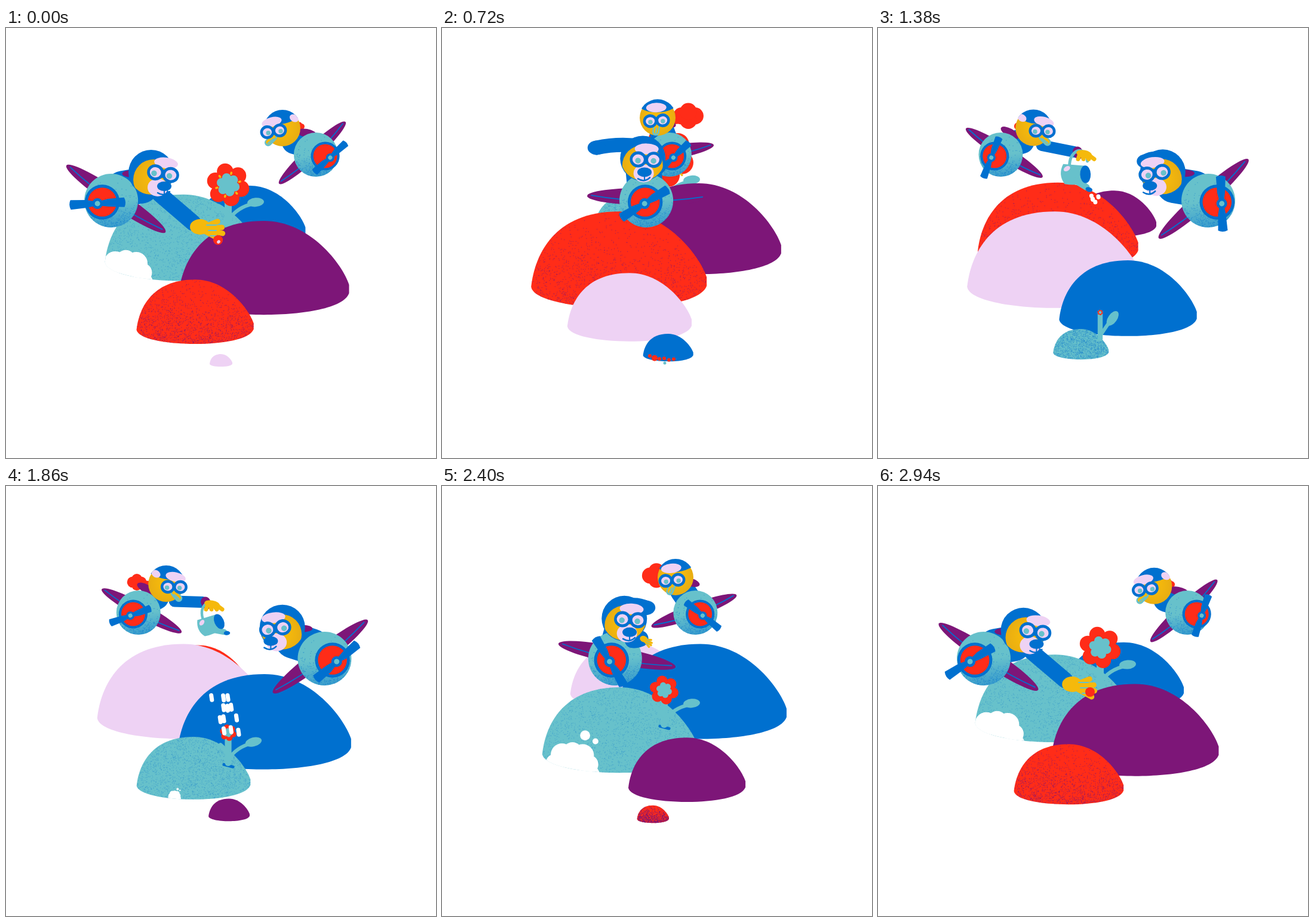
Animation of 720 by 720 pixels, one loop 3000 ms. Source, as an HTML page with a canvas:

```html
<!DOCTYPE html>
<html lang="en">
<head>
<meta charset="utf-8">
<title>Two pilots and a flower</title>
<style>
html, body { margin: 0; width: 100%; height: 100%; overflow: hidden; background: #fff; }
canvas { display: block; width: 720px; height: 720px; }
</style>
</head>
<body>
<canvas id="stage" width="720" height="720"></canvas>
<script>
const g = document.getElementById('stage').getContext('2d');
const LOOP = 3000, STEP = 60, RAD = Math.PI / 180;
const BLUE = '#0070cf', TEAL = '#67c1cb', RED = '#ff2c18', PURPLE = '#7d1678',
  YELLOW = '#f5b90c', LILAC = '#eed2f4', WHITE = '#fff';

const { sin, cos, abs, min, max, sign } = Math;
const clamp = v => min(1, max(0, v));
const since = (t, birth) => (t - birth + LOOP) % LOOP;

// Hills swing to alternate sides as they grow, rise and sink back
const tealHill = { birth: 1140, swing: -65, size: 235, color: TEAL, grain: BLUE };
const hills = [
  { birth: 0, swing: -65, size: 262, color: LILAC },
  { birth: 540, swing: 75, size: 262, color: BLUE },
  tealHill,
  { birth: 1740, swing: 75, size: 262, color: PURPLE },
  { birth: 2340, swing: -65, size: 262, color: RED, grain: PURPLE }];
const HILL_LIFE = 2700;

function hillBox(hill, age) {
  const phase = age < 1600 ? age / 1600 : 1 + (age - 1600) / 1400;
  const k = sin(phase * 90 * RAD), early = min(age, 1300);
  const w = 38 + hill.size * k, h = w * .55;
  const base = 567 - .045 * age - 1.9e-5 * early * (2 * age - early);
  return { x: 360 + hill.swing * k ** .8 - w / 2, y: base - h, w, h };
}

function random(seed) {
  return () => (seed = (seed * 16807) % 2147483647) / 2147483647;
}

function makeGrain(count, seed, keep) {
  const rnd = random(seed), out = [];
  while (out.length < count) {
    const x = rnd(), y = rnd();
    if (rnd() < keep(x, y)) out.push([x, y]);
  }
  return out;
}
const redGrain = makeGrain(1700, 11, (x, y) => .08 + .5 * y * y + .35 * max(0, .45 - x));
const tealGrain = makeGrain(2600, 23, () => 1);
const ballGrain = makeGrain(500, 37, (x, y) => y ** 3);

function sprinkle(grain, x, y, w, h, color, alpha) {
  g.globalAlpha = alpha;
  g.fillStyle = color;
  const count = grain.length * min(1, w / 90);
  for (let i = 0; i < count; i++) g.fillRect(x + grain[i][0] * w, y + grain[i][1] * h, 1.2, 1.2);
  g.globalAlpha = 1;
}

function oval(x, y, rx, ry, color, deg = 0) {
  g.beginPath();
  g.ellipse(x, y, rx, ry, deg * RAD, 0, 7);
  g.fillStyle = color;
  g.fill();
}
const dot = (x, y, r, color) => oval(x, y, r, r, color);

function line(color, width, ...pts) {
  g.beginPath();
  g.moveTo(pts[0], pts[1]);
  if (pts.length === 6) g.quadraticCurveTo(...pts.slice(2));
  else g.lineTo(pts[2], pts[3]);
  g.strokeStyle = color;
  g.lineWidth = width;
  g.lineCap = 'round';
  g.stroke();
}

function placed(x, y, deg, scale, draw) {
  g.save();
  g.translate(x, y);
  g.rotate(deg * RAD);
  g.scale(scale, scale);
  draw();
  g.restore();
}

function insideCircle(x, y, r, draw) {
  g.save();
  g.beginPath();
  g.arc(x, y, r, 0, 7);
  g.clip();
  draw();
  g.restore();
}

function drawHill(hill, age) {
  const { x, y, w, h } = hillBox(hill, age);
  const curve = (a, b, c, d, e, f) =>
    g.bezierCurveTo(x + a * w, y + b * h, x + c * w, y + d * h, x + e * w, y + f * h);
  g.save();
  g.beginPath();
  g.moveTo(x, y + .78 * h);
  curve(.02, .45, .13, 0, .5, 0);
  curve(.77, 0, .96, .46, 1, .68);
  g.lineTo(x + w, y + .77 * h);
  curve(.97, .93, .73, 1, .5, 1);
  curve(.25, 1, .01, .92, 0, .78);
  g.fillStyle = hill.color;
  g.fill();
  g.clip();
  if (hill.color === RED) sprinkle(redGrain, x, y, w, h, PURPLE, .6);
  if (hill === tealHill) {
    sprinkle(tealGrain, x, y, w, h, BLUE, .25);
    if (age > 620) drawBite(x + w * 240 / age, y + h * .96, w * .19 * clamp((age - 500) / 700), age);
  }
  g.restore();
  if (hill === tealHill) drawFlower(age);
}

function drawBite(x, y, s, age) {
  dot(x - .15 * s, y + .15 * s, .8 * s, WHITE);
  for (let i = 0; i < 6; i++) {
    const a = (i * 36 - 160) * RAD;
    dot(x + cos(a) * s * .6, y + sin(a) * s * .6, (.32 + .06 * (i % 2)) * s, WHITE);
  }
  if (age < 1600) {
    dot(x + .45 * s, y - 1.15 * s, .17 * s, WHITE);
    dot(x + .8 * s, y - .95 * s, .1 * s, WHITE);
  }
}

function drawFlower(age) {
  const R = .0195 * age * clamp((2760 - age) / 180);
  if (age < 120 || R === 0) return;
  const x = 372, y = 508 - .132 * min(age, 1900) - .06 * max(0, age - 1900);
  const foot = y + 44 + .013 * age, lx = x + min(58, 22 + .045 * age), ly = y + 5 + .012 * age;
  const open = clamp((age - 400) / 400);
  if (age > 650 && age < 1600) line(BLUE, 5, x - 7, foot, x + 8, foot + 4);
  line(TEAL, min(12, 7 + R * .3), x, y, x, foot - 3);
  line(TEAL, 6, x, foot - 8, x + 14, ly + 10, lx - 14, ly + 4);
  oval(lx - 12, ly + 2, 14, 7.5, TEAL, -50 * (1 - open) - 5);
  if (open) line(TEAL, 8, x, foot - 18, x - 8, foot - 28, x - 16 * open, foot - 32);

  const ring = (dist, r, color) => {
    for (let a = 17; a < 360; a += 60) dot(x + cos(a * RAD) * R * dist, y + sin(a * RAD) * R * dist, R * r, color);
  };
  ring(.62, .38, RED);
  dot(x, y, R * .65, RED);
  ring(.33, .21, TEAL);
  dot(x, y, R * .42, TEAL);
  const grow = clamp((age - 1800) / 540);
  if (grow) for (let a = 45; a < 400; a += 60) {
    const c = cos(a * RAD) * R, s = sin(a * RAD) * R, end = .54 + .3 * grow;
    line(YELLOW, 3.5, x + c * .52, y + s * .52, x + c * end, y + s * end);
  }
}

function drawWing(x, y, deg, len, thick) {
  placed(x, y, deg, 1, () => {
    oval(0, 0, len, thick, PURPLE);
    line(BLUE, 1.8, -len * .93, -1, 0, thick, len * .93, -1);
  });
}

function drawBall(x, y, r, hubX, hubY) {
  dot(x, y, r, TEAL);
  insideCircle(x, y, r, () => {
    const shade = g.createLinearGradient(x, y - r, x + r * .25, y + r);
    shade.addColorStop(.5, 'rgba(0,112,207,0)');
    shade.addColorStop(1, 'rgba(0,112,207,.45)');
    g.fillStyle = shade;
    g.fillRect(x - r, y - r, 2 * r, 2 * r);
    sprinkle(ballGrain, x - r, y - r, 2 * r, 2 * r, BLUE, .4);
  });
  dot(x + hubX * .65, y + hubY * .5, r * .65, BLUE);
  dot(x + hubX * .65, y + hubY * .5, r * .54, RED);
}

function drawPropeller(x, y, deg, len) {
  placed(x, y, deg, len / 47, () => {
    g.fillStyle = BLUE;
    for (const s of [-1, 1]) {
      g.beginPath();
      g.moveTo(0, -3);
      g.lineTo(s * 18, -7);
      g.lineTo(s * 45, -8);
      g.quadraticCurveTo(s * 49, 0, s * 45, 8);
      g.lineTo(s * 18, 6);
      g.lineTo(0, 3);
      g.fill();
    }
    dot(0, 0, 9, BLUE);
    dot(0, 0, 4.5, TEAL);
  });
}

function drawGoggles(x, y, deg, r, gap, look) {
  placed(x, y, deg, 1, () => {
    line(BLUE, r * 1.5, -gap, 0, gap, 0);
    for (const s of [-1, 1]) oval(s * gap, 0, r + 4.5, r + 4, BLUE);
    for (const s of [-1, 1]) {
      oval(s * gap, 0, r, r * .9, LILAC);
      dot(s * gap + look, r * .2, r * .5, TEAL);
    }
  });
}

function drawFace(x, y, r, turn) {
  const tone = g.createRadialGradient(x + turn * .5, y - 4, r * .5, x, y, r);
  tone.addColorStop(0, YELLOW);
  tone.addColorStop(1, '#e8ad12');
  dot(x, y, r, tone);
}

function drawDogHand(x, y, size) {
  placed(x, y, (1 - size) * 40, size, () => {
    oval(-14, -3, 17, 13, YELLOW);
    for (let i = 0; i < 4; i++) line(YELLOW, 9, -14, 0, 24 - (i - 1.7) ** 2 * 3, -12 + i * 10);
    for (let i = 0; i < 3; i++) line(TEAL, 2, -3 + i * 3, -6 + i * 9, 13, -6 + i * 9);
  });
}

// c: position along the swing, s: speed
function drawDog(t, c, s) {
  const bx = 366 - 190 * c, by = 289, hubX = -23 * c, hubY = 5;
  const hx = bx + 72 * c - 5 - 10 * s * s, hy = 218 + 24 * c * c;
  const turn = 17 * c + 3, ox = hx + turn, oy = hy + 2;
  const nx = ox + 5 * c - 3, ny = oy + 21;
  const ex = hx - 60 * s - 18, ey = hy - 18;
  const px = 345 - 6 * c, py = 245 + 91 * c * c;

  drawWing(bx + 8 * c, by - 7 + 4 * abs(c), 38 * c - 4, 100, 14.5);
  line(BLUE, 60, bx + (hx - bx) * .3, by - 20, bx + (hx - bx) * .75, hy + 22);
  oval(bx + (hx - bx) * .5, hy + 2, 15, 6, PURPLE);
  drawBall(bx, by, 45, hubX, hubY);
  if (c > .35) line(BLUE, 27, hx + 14, hy + 36, (hx + px) / 2, (hy + py) / 2 + 18, px - 26 * c, py - 10 * c);
  if (c > .1) drawDogHand(px, py, max(.35, c));

  line(BLUE, 24, hx, hy - 20, (hx + ex) / 2, ey - 8, ex, ey);
  oval(ex, ey, 15, 12, BLUE);
  dot(hx, hy, 38, BLUE);
  insideCircle(hx, hy, 37, () => drawFace(hx + turn * .3 - sign(turn) * 2, hy + 12, 34, turn));
  oval(hx + turn * 1.25, hy - 16, 20, 9, LILAC, 8 * c);
  oval((hx + nx) / 2, ny + 2, 17, 15, LILAC);
  drawGoggles(ox, oy, 10 * c, 9.5, 13, -2 * c);
  oval(nx, ny, 12, 8, BLUE);
  line(BLUE, 2.5, nx - 11, ny + 11, nx, ny + 18, nx + 9, ny + 9);
  line(BLUE, 2, nx, ny + 5, nx, ny + 13);
  drawPropeller(bx + hubX, by + hubY, 28.8 * t / STEP - 19 + 16 * c, 47);
}

function drawCan(x, y, scale, deg) {
  placed(x, y, deg, scale, () => {
    g.beginPath();
    g.ellipse(-12, 12, 15, 22, .2, 2.4, 6);
    g.strokeStyle = TEAL;
    g.lineWidth = 5;
    g.stroke();
    g.beginPath();
    g.moveTo(-38, 12);
    g.lineTo(-3, 16);
    g.lineTo(-3, 46);
    g.quadraticCurveTo(-20, 50, -37, 46);
    g.quadraticCurveTo(-48, 30, -38, 12);
    g.fillStyle = TEAL;
    g.fill();
    line(TEAL, 11, -18, 41, 0, 53);
    oval(-1, 31, 9, 15, BLUE);
    oval(4, 57, 6, 4, BLUE, 20);
    oval(-32, 20, 6, 4, LILAC, -30);
  });
}

function drawScarf(x, y, size) {
  for (let a = 0; a < 360; a += 90) dot(x + cos(a * RAD) * size * .6, y + sin(a * RAD) * size * .4, size * .75, RED);
}

function drawBird(t, c, s) {
  const bx = 361 + 158 * c, by = 212, hubX = 20 * c + 4, hubY = 5;
  const hx = bx - 56 * c - 13 * s * s, hy = 150 + 18 * c * c;
  const turn = -15 * c, ox = hx + turn, oy = hy + 5;
  const nx = ox - 9 * c, ny = oy + 22;
  const sx = hx + 30 * c + 48 * s, size = 6 + 13 * abs(s);
  const px = 347, py = 211 + 20 * s, reach = -c;

  drawWing(bx - 6 * c, by - 3, -38 * c - 5, 76, 12);
  line(RED, size, hx, hy + 4, sx, hy - 1);
  drawScarf(sx, hy - 3, size);
  line(BLUE, 42, bx + (hx - bx) * .2, by - 15, bx + (hx - bx) * .65, hy + 22);
  oval(bx + (hx - bx) * .28, hy + 8, 17, 7, PURPLE, 20 - 10 * c);
  drawBall(bx, by, 37, hubX, hubY);
  drawPropeller(bx + hubX, by + hubY, 28.8 * t / STEP - 27 - 16 * c, 37);

  if (reach > .3) {
    line(BLUE, 19, hx + 14, hy + 29, px - 18, py - 7);
    line(PURPLE, 16, px - 13, py - 8, px - 11, py - 3);
    drawCan(px, py, reach, 32 * (s - .25));
    for (let i = 0; i < 4; i++) line(YELLOW, 7, px - 9 + i * 4, py - 4, px - 12 + i * 9, py + 5);
    oval(px - 2, py - 4, 13, 6, YELLOW, 10);
  }

  drawFace(hx, hy, 30, turn);
  insideCircle(hx, hy, 31, () => {
    oval(hx - turn * .3, hy - 26, 34, 17, BLUE, turn * 1.2);
    if (abs(c) > .7) oval(hx - turn * 1.3, hy - 17, 8, 6, LILAC, 30);
  });
  oval(hx + turn * 1.2, hy - 18 + abs(turn) * .5, 17, 8, LILAC, turn);
  line(TEAL, 12, ox, oy + 10, nx, ny - 3);
  line(YELLOW, 7, ox, oy + 9, nx, ny - 4);
  drawGoggles(ox, oy, -5 * c - 3, 7.5, 10.5, 1.5 * c);
  line(TEAL, 2.5, ox, oy + 13, nx, ny - 2);
}

function drawDrops(t) {
  const rnd = random(7654321);
  for (let i = 0; i < 12; i++) {
    const age = t - 1320 - i * 15, jitter = rnd() - .5;
    if (age < 0 || age > 560) continue;
    const x = 360 + jitter * (16 + age * .07) + age * .013;
    const y = 281 + (i % 3) * 5 + .00045 * age * age, len = min(8, age * .02);
    line(WHITE, 7, x, y - len / 2, x + len * .15, y + len / 2);
  }
}

function drawBerry(t) {
  const age = since(t, 2940);
  if (age > 720) return;
  const fall = clamp((age - 120) / 360);
  const x = 355 + .012 * max(0, age - 60), y = 345 + min(10, age / 6) + .27 * max(0, age - 60);
  oval(x, y, 8, 8 + 5 * fall, RED);
  if (age === 60) oval(x + 1, y + 3, 3, 2.5, LILAC, -40);
  if (fall > .1) {
    for (const side of [-1, 1]) oval(x + side * 3.5, y - 3, 2, 3.5, LILAC);
    oval(x + 1, y + 7, 4.5, 3, LILAC);
  }
}

function drawSplash(t) {
  const spread = (t - 540) / 180, rnd = random(5);
  if (t < 660 || t > 820) return;
  for (let i = 0; i < 6; i++) dot(368 + (i - 2.5) * 8 * spread, 549 + i + 4 * rnd(), 3 + (i === 1) * 2, RED);
  dot(373, 561, 2.5, TEAL);
}

function draw(t) {
  g.fillStyle = WHITE;
  g.fillRect(0, 0, 720, 720);
  hills.map(hill => ({ hill, age: since(t, hill.birth) }))
    .filter(h => h.age < HILL_LIFE)
    .sort((a, b) => b.age - a.age)
    .forEach(({ hill, age }) => drawHill(hill, age));
  const turn = 360 * RAD * t / LOOP, swing = turn - (2 + 13 * sin(2 * turn)) * RAD;
  drawDrops(t);
  drawBird(t, cos(swing), sin(swing));
  drawDog(t, cos(swing), sin(swing));
  drawBerry(t);
  drawSplash(t);
}

const start = performance.now();
let shown = -1;
function tick() {
  const t = Math.floor((performance.now() - start) % LOOP / STEP) * STEP;
  if (t !== shown) draw(shown = t);
  requestAnimationFrame(tick);
}
tick();
</script>
</body>
</html>
```
